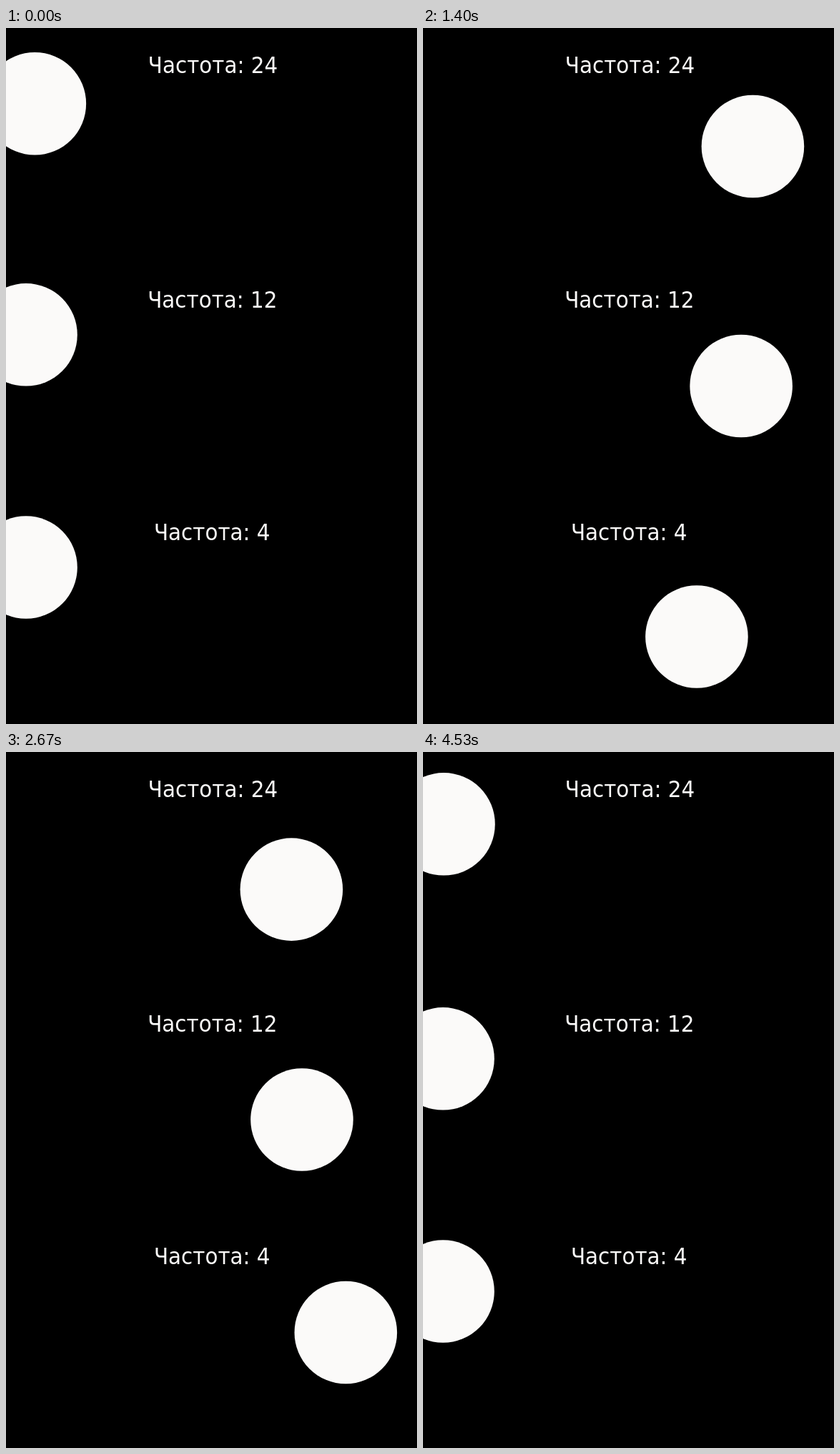
An HTML page for the animation above (4940 ms loop, 575 by 973 pixels).

```html
<!DOCTYPE html>
<html lang="ru">
<head>
<meta charset="utf-8">
<title>Частота</title>
<style>
  html, body { margin: 0; width: 100%; height: 100%; overflow: hidden; background: #000; }
  svg { display: block; width: 575px; height: 973px; }
  circle { fill: #fbfaf9; }
  text { fill: #fbfaf9; font: 32.7px "DejaVu Sans", sans-serif; text-anchor: middle; }
</style>
</head>
<body>
<svg viewBox="0 0 575 973">
  <circle r="71.8"/>
  <circle r="71.8"/>
  <circle r="71.8"/>
  <text transform="translate(289.5 62.7) scale(.9 1)">Частота: 24</text>
  <text transform="translate(288.8 390.7) scale(.9 1)">Частота: 12</text>
  <text transform="translate(288.2 715.7) scale(.9 1)">Частота: 4</text>
</svg>
<script>
  const LOOP = 4940, STEP = 1000 / 15, LEAD = 0.07;
  const balls = [...document.querySelectorAll('circle')];
  const lanes = [
    { fps: 24, x: 29, y: 100.8 },
    { fps: 12, x: 28, y: 428.8 },
    { fps: 4, x: 28, y: 754 }
  ];

  // Cubic from a to b with end slopes m and n
  const hermite = (s, a, b, m, n) =>
    a + m * s + (3 * (b - a) - 2 * m - n) * s * s + (2 * (a - b) + m + n) * s * s * s;

  // Offset along the swing: two seconds out, two seconds back
  function swing(sec) {
    const p = sec < 2 ? sec : Math.max(0, 4 - sec);
    return p < 1
      ? [hermite(p, 0, 272, 272, 277), hermite(p, 0, 115, 115, 0)]
      : [hermite(p - 1, 272, 553.4, 277, 0), hermite(p - 1, 115, 0, 0, 0)];
  }

  // Display steps at 15 per second, on a 10 ms clock
  function stepAt(ms) {
    const n = Math.floor(ms / STEP + 0.06);
    return Math.round(n * STEP / 10) * 10 > ms ? n - 1 : n;
  }

  function draw(ms) {
    const sec = stepAt(ms) / 15 + LEAD;
    lanes.forEach(({ fps, x, y }, i) => {
      const [dx, dy] = swing(Math.floor(sec * fps) / fps);
      balls[i].setAttribute('cx', x + dx);
      balls[i].setAttribute('cy', y + dy);
    });
  }

  const start = performance.now();
  function tick() {
    draw((performance.now() - start) % LOOP);
    requestAnimationFrame(tick);
  }
  tick();
</script>
</body>
</html>
```
